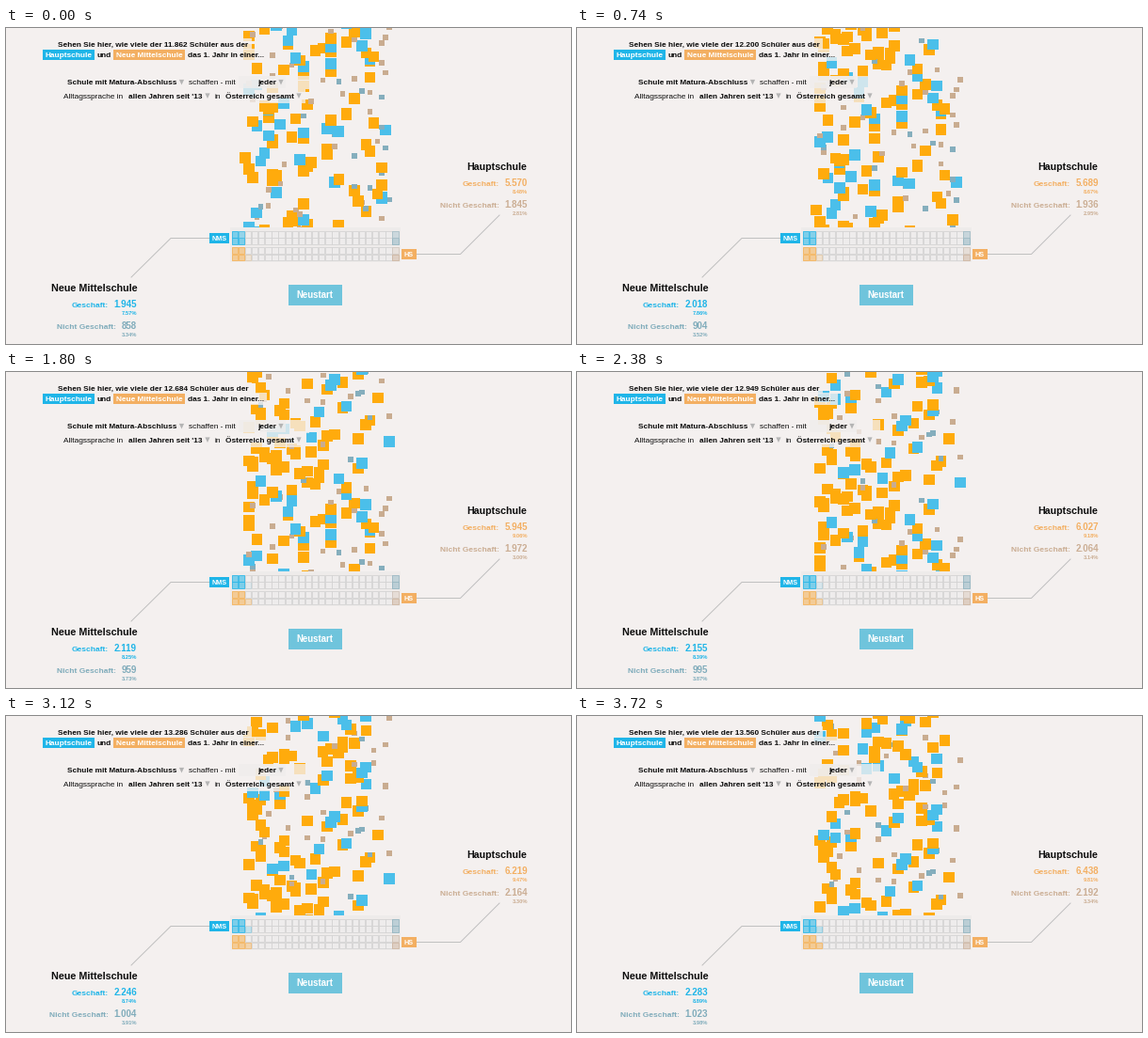
A matplotlib script that plays this animation: 600 px wide and 336 px high, repeating every 3.74 s.

```python
import numpy as np
import matplotlib.pyplot as plt
from matplotlib.animation import FuncAnimation
from matplotlib.collections import PolyCollection
from matplotlib.colors import to_rgb
from matplotlib.patches import Polygon, Rectangle

plt.rcParams["font.family"] = "Liberation Sans"

W, H, DPI = 600, 336, 96
FRAMES, STEP_MS = 187, 20
PUPILS = 9.13          # pupils represented by one falling square
SPEED = 1.5            # pixels per frame
LAND_Y = 218

BG = "#f4f0ef"
BLUE, ORANGE = "#1fb5e8", "#f3af62"
BLUE_GREY, TAN = "#80acbb", "#cbae94"
HS, HS_FAIL, NMS, NMS_FAIL = range(4)
SQUARE_COLORS = ["#ffab0c", "#c9ac90", "#4bbfea", "#85aebd"]
SQUARE_SIZES = [11.6, 5.6, 11.6, 5.6]
SCHOOL_TOTAL = [65650, 65650, 25690, 25690]

# Counter values (HS, HS_FAIL, NMS, NMS_FAIL) reached at certain frames
KEY_FRAMES = [0, 37, 65, 90, 119, 156, 186]
KEY_VALUES = np.array([
    [5570, 1845, 1945, 858],
    [5689, 1936, 2018, 904],
    [5826, 1963, 2045, 931],
    [5945, 1972, 2119, 959],
    [6027, 2064, 2155, 995],
    [6219, 2164, 2246, 1004],
    [6438, 2192, 2283, 1023],
])

rng = np.random.default_rng(13)


def build_squares():
    """Landing time and kind of every square, consistent with the counters."""
    kinds, lands = [], []
    for k in range(len(KEY_FRAMES) - 1):
        counts = np.rint((KEY_VALUES[k + 1] - KEY_VALUES[k]) / PUPILS).astype(int)
        batch = rng.permutation(np.repeat(np.arange(4), counts))
        start, end = KEY_FRAMES[k], KEY_FRAMES[k + 1]
        kinds.extend(batch)
        lands.extend(np.linspace(start, end, len(batch) + 1)[1:])
    later = np.arange(FRAMES, FRAMES + 170)
    kinds.extend(rng.choice(4, len(later), p=[0.5, 0.2, 0.2, 0.1]))
    lands.extend(later)
    return np.array(kinds), np.array(lands)


def build_counters():
    """Counter values for each frame, rising in whole squares."""
    table = np.zeros((FRAMES, 4))
    for k in range(len(KEY_FRAMES) - 1):
        start, end = KEY_FRAMES[k], KEY_FRAMES[k + 1]
        inside = (lands > start) & (lands <= end + 1e-6)
        for kind in range(4):
            times = lands[inside & (kinds == kind)]
            low, high = KEY_VALUES[k:k + 2, kind]
            for i in range(start, end + 1):
                done = np.sum(times <= i + 1e-6) / len(times)
                table[i, kind] = round(low + (high - low) * done)
    return table.astype(int)


kinds, lands = build_squares()
counters = build_counters()
u = rng.random(len(kinds))
is_small = kinds % 2 == 1
lane = np.where(is_small, 1 - u ** 1.25, u ** 1.25)
xs = 254 + np.rint(lane * 36) / 36 * 149 + rng.choice([0, 4], len(kinds))
sizes = np.array(SQUARE_SIZES)[kinds]
square_rgb = np.array([to_rgb(c) for c in SQUARE_COLORS])[kinds]

fig = plt.figure(figsize=(W / DPI, H / DPI), dpi=DPI, facecolor=BG)
ax = fig.add_axes([0, 0, 1, 1])
ax.set_xlim(0, W)
ax.set_ylim(H, 0)
ax.axis("off")


def text(x, cy, s, px, color="#0c0c0c", bold=True, ha="left"):
    return ax.text(x, cy + 0.36 * px, s, fontsize=px * 72 / DPI, color=color,
                   weight="bold" if bold else "normal", ha=ha,
                   va="baseline", zorder=6)


def box(x0, y0, x1, y1, color, z=5, alpha=1):
    ax.add_patch(Rectangle((x0, y0), x1 - x0, y1 - y0, facecolor=color,
                           edgecolor="none", alpha=alpha, zorder=z))


def arrow(x, cy):
    ax.add_patch(Polygon([(x - 2.6, cy - 2.6), (x + 2.6, cy - 2.6), (x, cy + 3)],
                         facecolor="#b4b4b4", edgecolor="none", zorder=6))


def rects(x, y, w, h):
    """Corner arrays for boxes given by left, top, width and height."""
    return np.stack([np.stack([x, y], -1), np.stack([x + w, y], -1),
                     np.stack([x + w, y + h], -1), np.stack([x, y + h], -1)], 1)


def dotted(n):
    return f"{n:,}".replace(",", ".")


squares = PolyCollection([], edgecolors="none", zorder=1)
ax.add_collection(squares)

# Translucent panels behind the sentence
box(52, 11, 261, 23, BG, 3, 0.78)
box(36, 22, 277, 35, BG, 3, 0.78)
box(60, 51, 322, 64.5, BG, 3, 0.78)
box(58, 64.5, 318, 80, BG, 3, 0.78)
box(247, 51, 297, 64, "#efedec", 3, 0.8)

# Sentence
S = 8.28
headline = text(55, 17, "", S)
box(38.5, 22.5, 94, 34, BLUE)
text(41, 28, "Hauptschule", S, "white")
text(96.5, 28, "und", S)
box(114, 22.5, 190, 34, ORANGE)
text(117, 28, "Neue Mittelschule", S, "white")
text(193, 28, "das 1. Jahr in einer...", S)
text(65, 57.5, "Schule mit Matura-Abschluss", S)
text(194, 57.5, "schaffen - mit", S, bold=False)
text(267, 57.5, "jeder", S)
text(61, 72, "Alltagssprache in", S, bold=False)
text(130, 72, "allen Jahren seit '13", S)
text(221, 72, "in", S, bold=False)
text(233, 72, "Österreich gesamt", S)
for ax_x, ax_y in [(186.5, 57.5), (292, 57.5), (214, 72), (311, 72)]:
    arrow(ax_x, ax_y)

# Connectors, tags and button
for px, py in [([133, 175, 216], [265, 223.5, 223.5]),
               ([435, 482.5, 524], [240.5, 240.5, 199])]:
    ax.plot(px, py, color="#bdbdbd", lw=0.7, zorder=4)
box(216, 218, 237, 229, BLUE)
text(226.5, 223.5, "NMS", 7.2, "white", ha="center")
box(420, 235, 435.5, 246, ORANGE)
text(427.8, 240.5, "HS", 7.2, "white", ha="center")
box(300, 273, 356.5, 295, "#6fc4dc")
text(328.3, 283.5, "Neustart", 9.6, "white", ha="center")

# Percentage grid: 50 cells of two percent for each school
box(237.5, 212, 418.5, 249, "#eeebea", 2)
COLS, PITCH, CELL_H = 25, 7.12, 7.3
cell = np.arange(2 * COLS)
cell_x = 239.6 + cell // 2 * PITCH


def cell_grid(top):
    cell_y = top + (1 - cell % 2) * CELL_H
    grid = PolyCollection(rects(cell_x, cell_y, 6.3, 6.5),
                          linewidths=0.6, zorder=3)
    ax.add_collection(grid)
    return grid


def fill_grid(grid, passed, failed, pass_color, fail_color):
    left = np.clip(passed / 2 - cell, 0, 1)[:, None]
    from_right = 2 * (COLS - 1 - cell // 2) + cell % 2
    right = np.clip(failed / 2 - from_right, 0, 1)[:, None]

    def blend(base, strength):
        a, b = left * strength, right * strength * 0.85
        return (np.array(to_rgb(base)) * (1 - a - b)
                + np.array(to_rgb(pass_color)) * a
                + np.array(to_rgb(fail_color)) * b)

    grid.set_facecolor(blend("#eeecec", 0.55))
    grid.set_edgecolor(blend("#d3d2d2", 0.95))


nms_grid = cell_grid(216)
hs_grid = cell_grid(233.3)

# Result blocks
text(553.5, 147, "Hauptschule", 10.6, ha="right")
text(48, 276, "Neue Mittelschule", 10.7)


def result(right, cy, label, color):
    return (text(right, cy, label, 8.35, color, ha="right"),
            text(right, cy, "", 9.7, color, ha="right"),
            text(right, cy + 9.3, "", 5.8, color, ha="right"), right)


results = [
    result(554, 165, "Geschaft:", ORANGE),
    result(554, 188, "Nicht Geschaft:", TAN),
    result(139, 294, "Geschaft:", BLUE),
    result(139, 317, "Nicht Geschaft:", BLUE_GREY),
]


def show_result(parts, value, percent):
    label, number, share, right = parts
    digits = dotted(value)
    width = 9.7 * sum(0.278 if c == "." else 0.556 for c in digits)
    label.set_x(right - width - 5.5)
    number.set_text(digits)
    share.set_text(f"{percent:.2f}%")


def update(i):
    y = LAND_Y - SPEED * (lands - i)
    seen = (y > -8) & (y < LAND_Y)
    s = sizes[seen]
    squares.set_verts(rects(xs[seen] - s / 2, y[seen] - s / 2, s, s))
    squares.set_facecolor(square_rgb[seen])

    total = int(11862.6 + PUPILS * i)
    headline.set_text(f"Sehen Sie hier, wie viele der {dotted(total)} Schüler aus der")
    percents = [100 * v / t for v, t in zip(counters[i], SCHOOL_TOTAL)]
    for parts, value, percent in zip(results, counters[i], percents):
        show_result(parts, int(value), percent)
    fill_grid(hs_grid, percents[HS], percents[HS_FAIL], "#f7b050", TAN)
    fill_grid(nms_grid, percents[NMS], percents[NMS_FAIL], BLUE, BLUE_GREY)
    return []


anim = FuncAnimation(fig, update, frames=FRAMES, interval=STEP_MS,
                     init_func=lambda: update(0), repeat=True, repeat_delay=0)
plt.show()
```
